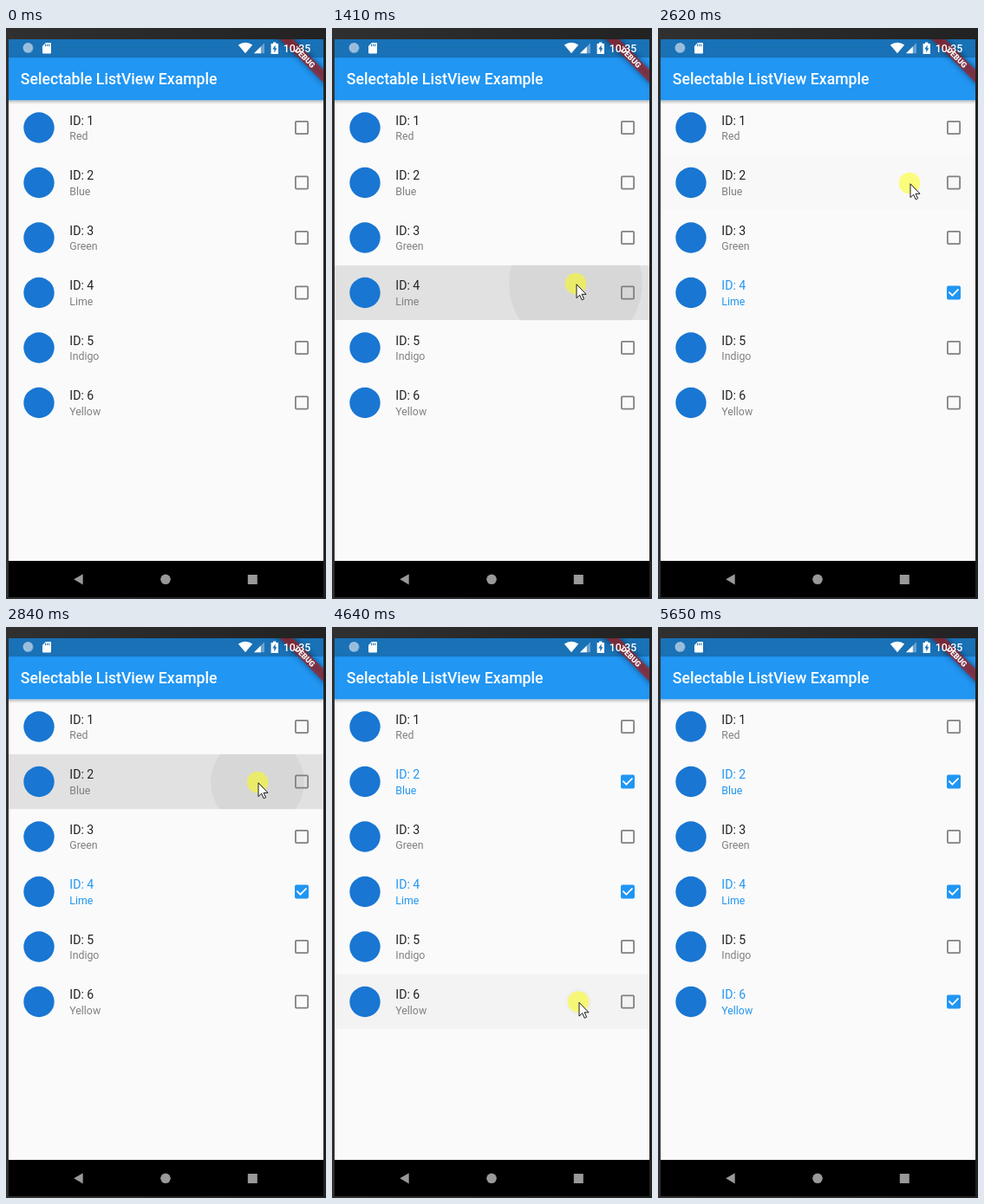
Animation of 369 by 659 pixels, one loop 6880 ms. Source, as an HTML page:

```html
<!DOCTYPE html>
<html lang="en">
<head>
<meta charset="utf-8">
<title>Selectable list</title>
<style>
  html, body { margin: 0; width: 100%; height: 100%; overflow: hidden; background: #262626; }
  svg { display: block; width: 100%; height: 100%; }
  text { font-family: Roboto, sans-serif; }
  .medium { font-weight: 500; fill: #fff; }
  .name { font-size: 14.1px; fill: #212121; }
  .detail { font-size: 12.35px; fill: #808080; }
  .box { fill: none; stroke: #808080; stroke-width: 1.76; }
  .tick { fill: none; stroke: #fff; stroke-width: 1.76; visibility: hidden; }
  .on .name, .on .detail { fill: #2196f3; }
  .on .box { fill: #2196f3; stroke: #2196f3; }
  .on .tick { visibility: visible; }
</style>
</head>
<body>
<svg viewBox="0 0 369 659">
  <defs>
    <linearGradient id="desk" x2="1" y2="0">
      <stop stop-color="#303030"/><stop offset="1" stop-color="#222"/>
    </linearGradient>
    <linearGradient id="shade" x2="0" y2="1">
      <stop stop-opacity=".24"/><stop offset="1" stop-opacity="0"/>
    </linearGradient>
    <filter id="blur" x="-20%" y="-150%" width="140%" height="400%"><feGaussianBlur stdDeviation="3.5"/></filter>
    <clipPath id="screen"><rect x="3" y="13" width="363" height="644"/></clipPath>
    <clipPath id="rowClip"><rect id="rowClipRect" x="3" width="363" height="63.5"/></clipPath>
  </defs>
  <rect width="369" height="659" fill="url(#desk)"/>

  <rect x="3" y="13" width="363" height="602" fill="#fafafa"/>
  <g clip-path="url(#rowClip)">
    <rect id="highlight" x="3" width="363" height="63.5" fill="#bcbcbc"/>
    <circle id="ripple" fill="#c8c8c8"/>
  </g>
  <g id="rows"></g>

  <rect x="3" y="83.4" width="363" height="4.6" fill="url(#shade)"/>
  <rect x="3" y="34" width="363" height="49.4" fill="#2196f3"/>
  <rect x="3" y="13" width="363" height="21.2" fill="#1971b6"/>
  <text class="medium" x="16.8" y="65.2" font-size="17.65">Selectable ListView Example</text>

  <g clip-path="url(#screen)">
    <g transform="translate(366 13) rotate(45)">
      <rect x="-45" y="24.7" width="90" height="10.6" opacity=".5" filter="url(#blur)"/>
      <rect x="-45" y="24.7" width="90" height="10.6" fill="#b71c1c" fill-opacity=".63"/>
      <text y="33.2" text-anchor="middle" font-size="9" font-weight="900" fill="#fff">DEBUG</text>
    </g>
  </g>

  <circle cx="25.5" cy="23" r="6" fill="#7fb0d8"/>
  <circle cx="25" cy="22.5" r="4.6" fill="#98bcdb" stroke="#c0d6e9" stroke-dasharray="2 1.5"/>
  <g fill="#fff">
    <path d="M45.8 17H51q1 0 1 1v10.5q0 1-1 1H43q-1 0-1-1V21z"/>
    <path d="M276 29.3 267.8 19.6Q276 14 284.2 19.6z"/>
    <path d="M286 29.3 298 17.3v12z" opacity=".35"/>
    <path d="M286 29.3 293.8 21.5v7.8z"/>
    <path d="M308 16.5h3.4V18H314v12h-8.4V18h2.4z"/>
  </g>
  <path d="M45.5 18.5v2.7M47.6 18.5v2.7M49.7 18.5v2.7" stroke="#1971b6"/>
  <path d="M310.6 19.5 307.4 24.6h1.9v3.9l3-5.2h-1.7z" fill="#1971b6"/>
  <text class="medium" x="319.8" y="27.8" font-size="12.4">10:35</text>

  <rect x="3" y="615" width="363" height="42"/>
  <g fill="#999">
    <path d="M78.2 636.3 88.7 630.2v12.2z"/>
    <circle cx="184" cy="636.3" r="5.8"/>
    <rect x="278.8" y="631" width="11" height="11"/>
  </g>

  <g id="cursor">
    <circle r="12.3" fill="#ff0" fill-opacity=".5"/>
    <path d="M1 .8V16.6L4.7 13.2 7.2 18.8 9.6 17.7 7.1 12.3H12z" fill="#fff" stroke="#000" stroke-width=".9"/>
  </g>
</svg>
<script>
const LOOP = 6880, STEP = 201.8, LEAD = 12, LAST_STEP = 28;
const PITCH = 63.5, FIRST = 115;
const $ = id => document.getElementById(id);
const set = (el, attrs) => Object.entries(attrs).forEach(([k, v]) => el.setAttribute(k, v));
const rowY = i => FIRST + i * PITCH;
const clamp = v => Math.max(0, Math.min(1, v));
const smooth = k => k * k * (3 - 2 * k);

$('rows').innerHTML = ['Red', 'Blue', 'Green', 'Lime', 'Indigo', 'Yellow'].map((color, i) => `
  <g transform="translate(0 ${rowY(i)})">
    <circle cx="38" r="17.7" fill="#1976d2"/>
    <text class="name" x="73.3" y="-3.2">ID: ${i + 1}</text>
    <text class="detail" x="73.3" y="14.4">${color}</text>
    <rect class="box" x="333.9" y="-7.1" width="14.2" height="14.2" rx="1"/>
    <path class="tick" d="M335.4 -.8 339.4 3.2 346.5 -4"/>
  </g>`).join('');
const rows = [...$('rows').children];

// Speed is the ripple growth in pixels per ms.
const presses = [
  { row: 3, x: 281, y: 295, start: 1205, speed: .37 },
  { row: 1, x: 290, y: 179, start: 2610, speed: .25 },
  { row: 5, x: 284, y: 432.5, start: 4580, speed: .247 }
];

// The pointer glides to each press, then leaves downwards.
const moves = [
  { from: 1, to: 5, ...presses[0] },
  { from: 9, to: 12, ...presses[1] },
  { from: 16, to: 22, ...presses[2] },
  { from: 26, to: 27, x: 284, y: 447 }
];

function pointerAt(step) {
  let x = 283, y = 411;
  for (const move of moves) {
    const k = smooth(clamp((step - move.from) / (move.to - move.from)));
    x += (move.x - x) * k;
    y += (move.y - y) * k;
  }
  return [x, y];
}

function drawInk({ row, x, y, speed }, age) {
  const strength = .4 * clamp(age / 200) * clamp((600 - age) / 300);
  const top = rowY(row) - PITCH / 2;
  set($('rowClipRect'), { y: top });
  set($('highlight'), { y: top, opacity: strength });
  set($('ripple'), { cx: x, cy: y, r: age * speed, opacity: strength });
}

function draw(now) {
  // The picture is held for one step at a time.
  const step = Math.min(LAST_STEP, Math.floor((now % LOOP + LEAD) / STEP));
  const time = step * STEP;

  $('cursor').style.visibility = step > 0 && step < LAST_STEP ? 'visible' : 'hidden';
  set($('cursor'), { transform: `translate(${pointerAt(step)})` });

  presses.forEach(press => rows[press.row].classList.toggle('on', time - press.start > 400));
  const current = presses.findLast(press => time >= press.start) ?? presses[0];
  drawInk(current, Math.max(0, time - current.start));
  requestAnimationFrame(draw);
}
draw(0);
</script>
</body>
</html>
```
